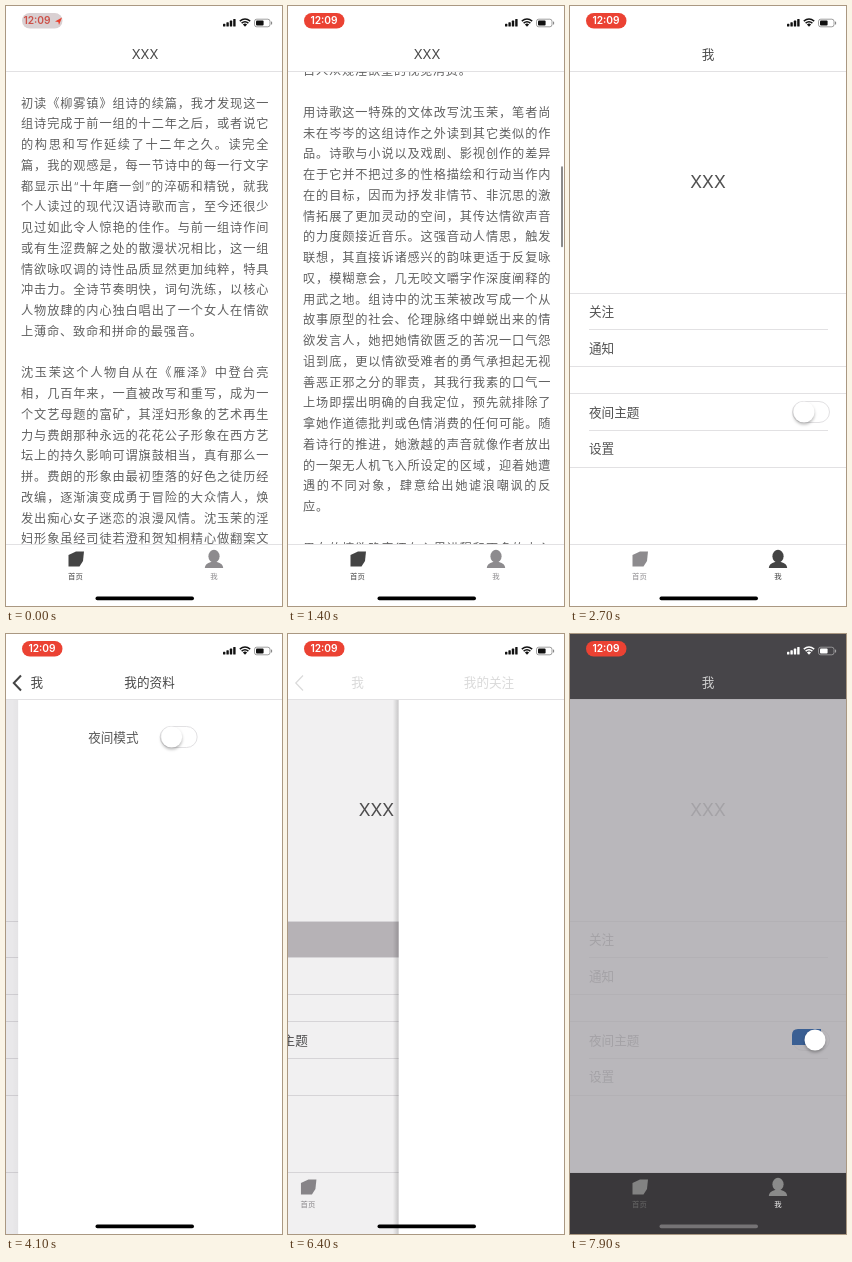
These frames come from a looping animation (276x600 px, 8 s). An HTML page:

```html
<!DOCTYPE html>
<html lang="zh-CN">
<head>
<meta charset="utf-8">
<title>阅读</title>
<style>
  html, body { margin: 0; width: 276px; height: 600px; overflow: hidden; background: #fff; }
  body { position: relative; font-family: Inter, "Noto Sans CJK SC", "Noto Sans CJK", sans-serif; }
  #view { position: absolute; left: 0; top: 66px; width: 276px; height: 473px; overflow: hidden; }
  #article { position: absolute; left: 15px; top: 21.6px; width: 248px; color: #606060;
             font-size: 12.2px; font-weight: 300; letter-spacing: .6px; line-height: 20.75px; }
  #article div { height: 20.75px; white-space: nowrap; text-align: justify; text-align-last: justify; }
  #article .end { text-align-last: left; letter-spacing: .8px; }
  #thumb { position: absolute; right: 1px; top: 0; width: 2.5px; height: 81px; border-radius: 2px; background: #8a8a8a; }
  svg { position: absolute; left: 0; top: 0; }
  .line { stroke: var(--line); }
  .knob { fill: #fff; filter: drop-shadow(0 2px 1.5px rgba(0,0,0,.28)); }
</style>
</head>
<body>
<div id="view"><div id="article"></div><div id="thumb"></div></div>
<svg id="stage" width="276" height="600" viewBox="0 0 276 600"></svg>
<script>
const LOOP = 8000, STEP = 100, W = 276;
const $ = id => document.getElementById(id);

const ARTICLE = `初读《柳雾镇》组诗的续篇，我才发现这一
组诗完成于前一组的十二年之后，或者说它
的构思和写作延续了十二年之久。读完全
篇，我的观感是，每一节诗中的每一行文字
都显示出“十年磨一剑”的淬砺和精锐，就我
个人读过的现代汉语诗歌而言，至今还很少
见过如此令人惊艳的佳作。与前一组诗作间
或有生涩费解之处的散漫状况相比，这一组
情欲咏叹调的诗性品质显然更加纯粹，特具
冲击力。全诗节奏明快，词句洗练，以核心
人物放肆的内心独白唱出了一个女人在情欲
上薄命、致命和拼命的最强音。

沈玉茉这个人物自从在《雁泽》中登台亮
相，几百年来，一直被改写和重写，成为一
个文艺母题的富矿，其淫妇形象的艺术再生
力与费朗那种永远的花花公子形象在西方艺
坛上的持久影响可谓旗鼓相当，真有那么一
拼。费朗的形象由最初堕落的好色之徒历经
改编，逐渐演变成勇于冒险的大众情人，焕
发出痴心女子迷恋的浪漫风情。沈玉茉的淫
妇形象虽经司徒若澄和贺知桐精心做翻案文
章，其人其事仍难脱出旧有的套路，多半只
在戏台上博人一叹，并未真正触及她内心的
幽暗与热望，反倒在层层转述中一再迎合了
古人众窥淫欲望的视觉消费。

用诗歌这一特殊的文体改写沈玉茉，笔者尚
未在岑岑的这组诗作之外读到其它类似的作
品。诗歌与小说以及戏剧、影视创作的差异
在于它并不把过多的性格描绘和行动当作内
在的目标，因而为抒发非情节、非沉思的激
情拓展了更加灵动的空间，其传达情欲声音
的力度颇接近音乐。这强音动人情思，触发
联想，其直接诉诸感兴的韵味更适于反复咏
叹，模糊意会，几无咬文嚼字作深度阐释的
用武之地。组诗中的沈玉茉被改写成一个从
故事原型的社会、伦理脉络中蝉蜕出来的情
欲发言人，她把她情欲匮乏的苦况一口气怨
诅到底，更以情欲受难者的勇气承担起无视
善恶正邪之分的罪责，其我行我素的口气一
上场即摆出明确的自我定位，预先就排除了
拿她作道德批判或色情消费的任何可能。随
着诗行的推进，她激越的声音就像作者放出
的一架无人机飞入所设定的区域，迎着她遭
遇的不同对象，肆意给出她谑浪嘲讽的反
应。

男女的情欲确实须在心里进程和更多的内心
独白之中展开，诗人由此让她一步步走出旧
日的院落，把每一次相遇都写成一场对话，
也写成一次对自身命运的追问。`.split('\n');

$('article').innerHTML = ARTICLE.map((s, i) =>
  `<div class="${ARTICLE[i + 1] ? '' : 'end'}">${s}</div>`).join('');

// Text placed by its vertical centre
const label = (x, y, s, size, attrs = '') =>
  `<text x="${x}" y="${y + size * 0.37}" font-size="${size}" ${attrs}>${s}</text>`;
const mid = 'text-anchor="middle"';
const rule = (y, x1 = 0, x2 = W) => `<path class="line" d="M${x1} ${y + .5}H${x2}"/>`;
const toggle = (x, y, id) => `<g transform="translate(${x} ${y})">
  <rect x=".5" y=".5" width="37" height="21" rx="10.5" fill="var(--page)" stroke="var(--line)"/>
  <path id="${id}Fill" d="M0 16V6Q0 0 6 0H29V16Z" fill="#3a5f93" opacity="0"/>
  <circle id="${id}Knob" class="knob" cx="12" cy="11" r="10.5"/></g>`;
const tabBar = active => {
  const tone = name => name === active ? 'on' : 'off';
  const tab = (x, name, text, shape) => `<g fill="var(--${tone(name)})">${shape}
    ${label(x, 570, text, 7.4, `${mid} fill="var(--${tone(name)}Text)"`)}</g>`;
  return `<rect y="539" width="276" height="61" fill="var(--tab)"/>${rule(538)}` +
    tab(69.5, 'home', '首页', '<path d="M62.5 549L70 545.5H78L77 555L73.5 560.5H62.5Z"/>') +
    tab(208, 'me', '我', `<ellipse cx="208" cy="550.2" rx="5.6" ry="6.4"/>
      <path d="M198.8 562Q199 557.5 205 556H211Q217 557.5 217.2 562Z"/>`);
};

$('stage').innerHTML = `
<defs><linearGradient id="edge"><stop offset="0" stop-opacity="0"/><stop offset="1" stop-opacity=".22"/></linearGradient></defs>
<g id="home">${tabBar('home')}</g>
<g id="me">
  <rect width="276" height="600" fill="var(--page)"/>
  <rect id="pressed" y="287" width="276" height="37" fill="#c0bdc0"/>
  ${rule(287)}${rule(323, 19, 258)}${rule(360)}${rule(387)}${rule(424, 19, 258)}${rule(461)}
  <g fill="var(--text)">
    ${label(138, 176, 'XXX', 17.3, mid)}
    ${[['关注', 305.5], ['通知', 342], ['夜间主题', 406], ['设置', 442.5]].map(([s, y]) => label(19, y, s, 12.6)).join('')}
  </g>
  ${toggle(222, 395, 'theme')}${tabBar('me')}
</g>
<rect id="dim" width="276" height="600" fill="#302838"/>
<g id="detail">
  <rect id="shadow" x="-6" width="6" height="600" fill="url(#edge)"/>
  <rect width="276" height="600" fill="#fff"/>
  <g id="profile">${label(70, 103, '夜间模式', 12.6, 'fill="#585858"')}${toggle(141.5, 92, 'mode')}</g>
</g>
<rect width="276" height="66" fill="var(--nav)"/>${rule(65)}
<g fill="var(--title)">
  ${label(139, 48.5, 'XXX', 13, mid + ' id="homeTitle"')}
  ${label(0, 48.5, '我', 12.6, mid + ' id="meTitle"')}
  ${label(0, 48.5, '', 12.6, mid + ' id="detailTitle" font-weight="500"')}
</g>
<path id="back" d="M15 41.5L7.8 49L15 56.5" fill="none" stroke="#444"/>
<rect id="pill" x="16" y="7" width="40.5" height="15.5" rx="7.75"/>
${label(36, 14.7, '12:09', 10.2, mid + ' font-weight="600" id="clock"')}
<path id="arrow" d="M49 15.5L56 11.5L53 19L52.3 16Z" fill="#e8402f"/>
<g fill="var(--icon)">
  ${[0, 1, 2, 3].map(i => `<rect x="${217 + i * 3.4}" y="${17.8 - i * 1.6}" width="2.4" height="${2.7 + i * 1.6}" rx=".6"/>`).join('')}
  <path d="M239 20.8L236.9 18.4Q239 16.8 241.1 18.4Z"/>
  <g fill="none" stroke="var(--icon)" stroke-width="1.5">
    <path d="M235.6 17.1Q239 14.3 242.4 17.1M233.8 15.2Q239 10.9 244.2 15.2"/>
    <rect x="248.5" y="13.2" width="15.5" height="7.6" rx="2.2" stroke-width=".8" opacity=".5"/>
  </g>
  <rect x="250" y="14.6" width="7.6" height="4.8" rx="1"/><rect x="265" y="15.5" width="1.1" height="3" rx=".5" opacity=".5"/>
</g>
<rect x="89.5" y="590.6" width="98.5" height="3.6" rx="1.8" fill="var(--bar)"/>`;

const clamp = v => Math.max(0, Math.min(1, v));
const span = (t, a, b) => clamp((t - a) / (b - a));
function track(keys, t) {
  if (t <= keys[0][0]) return keys[0][1];
  for (let i = 1; i < keys.length; i++) {
    const [a, x] = keys[i - 1], [b, y] = keys[i];
    if (t <= b) return x + (y - x) * (t - a) / (b - a);
  }
  return keys[keys.length - 1][1];
}
const mix = (a, b, k) => 'rgb(' + a.map((v, i) => Math.round(v + (b[i] - v) * k)) + ')';
const grey = v => [v, v, v];
const spring = dt => { const x = Math.max(0, dt) * 0.012; return 1 - (1 + x) * Math.exp(-x); };

const SCROLL = [[100, 0], [300, 45], [500, 190], [700, 300], [900, 350], [1000, 375], [1200, 490],
  [1400, 551], [1600, 572], [1900, 582]];
const VISITS = [[3692, 4750, '我的资料'], [5436, 6285, '我的关注']];
const ME_ALPHA = [[.2, 1], [.6, .2], [.95, 1]];
const DETAIL_ALPHA = [[0, 0], [.18, .18], [.6, .2], [.95, 1]];
// name, light, dark
const THEME = [
  ['page', grey(255), [185, 183, 187]], ['nav', grey(255), [71, 69, 73]], ['tab', grey(255), [58, 56, 59]],
  ['title', grey(72), grey(210)], ['text', grey(80), [164, 162, 166]], ['line', [226, 225, 227], [179, 177, 181]],
  ['icon', grey(17), grey(255)], ['bar', grey(0), [117, 115, 117]],
  ['on', grey(68), grey(138)], ['onText', grey(68), grey(240)],
  ['off', [141, 139, 142], grey(130)], ['offText', [141, 139, 142], grey(104)]];

const set = (id, attrs) => { for (const k in attrs) $(id).setAttribute(k, attrs[k]); };
const show = (id, on) => { $(id).style.display = on ? '' : 'none'; };

function render(t) {
  const onHome = t < 2300;
  show('view', onHome); show('home', onHome); show('homeTitle', onHome);
  show('me', !onHome); show('meTitle', !onHome);

  const y = track(SCROLL, t);
  $('article').style.transform = `translateY(${-y}px)`;
  $('thumb').style.transform = `translateY(${y / 2762 * 473}px)`;
  $('thumb').style.opacity = span(t, 100, 300) * (1 - span(t, 1900, 2200));

  // p: 0 shows the list, 1 shows the detail page
  const visit = t < 5400 ? VISITS[0] : VISITS[1];
  let p = t > visit[1] ? 1 - spring(t - visit[1]) : spring(t - visit[0]);
  p = p < .003 ? 0 : p > .997 ? 1 : p;
  const q = 1 - p;
  set('me', { transform: `translate(${-0.3 * W * p} 0)` });
  set('dim', { opacity: 0.11 * p });
  set('detail', { transform: `translate(${W * q} 0)` });
  set('shadow', { opacity: clamp(2 * q) });
  show('detail', p > 0);
  show('profile', visit === VISITS[0]);
  set('pressed', { opacity: span(t, 5250, 5400) * (1 - span(t, 6500, 6900)) });

  const ease = p * p * (3 - 2 * p);
  set('meTitle', { x: 138 - 55 * (p + ease), opacity: track(ME_ALPHA, p), 'font-weight': p > .7 ? 400 : 500 });
  const alpha = track(DETAIL_ALPHA, p);
  $('detailTitle').textContent = visit[2];
  set('detailTitle', { x: 138 + 172 * q ** 1.1, opacity: alpha });
  set('back', { opacity: alpha, 'stroke-width': p > .7 ? 2 : 1.2 });

  const night = span(t, 7700, 7900), slide = span(t, 7600, 7900);
  for (const [name, a, b] of THEME) document.documentElement.style.setProperty('--' + name, mix(a, b, night));
  set('themeKnob', { cx: 12 + 11 * slide });
  set('themeFill', { opacity: slide });

  const rec = span(t, 0, 300);
  set('pill', { fill: mix([217, 208, 210], [235, 66, 51], rec) });
  set('clock', { fill: mix([205, 80, 72], grey(255), rec), x: 36 - 5 * (1 - rec) });
  set('arrow', { opacity: 1 - rec });
}

const start = performance.now();
function tick() {
  const t = (performance.now() - start) % LOOP;
  render(Math.floor(t / STEP) * STEP);
  requestAnimationFrame(tick);
}
tick();
</script>
</body>
</html>
```
